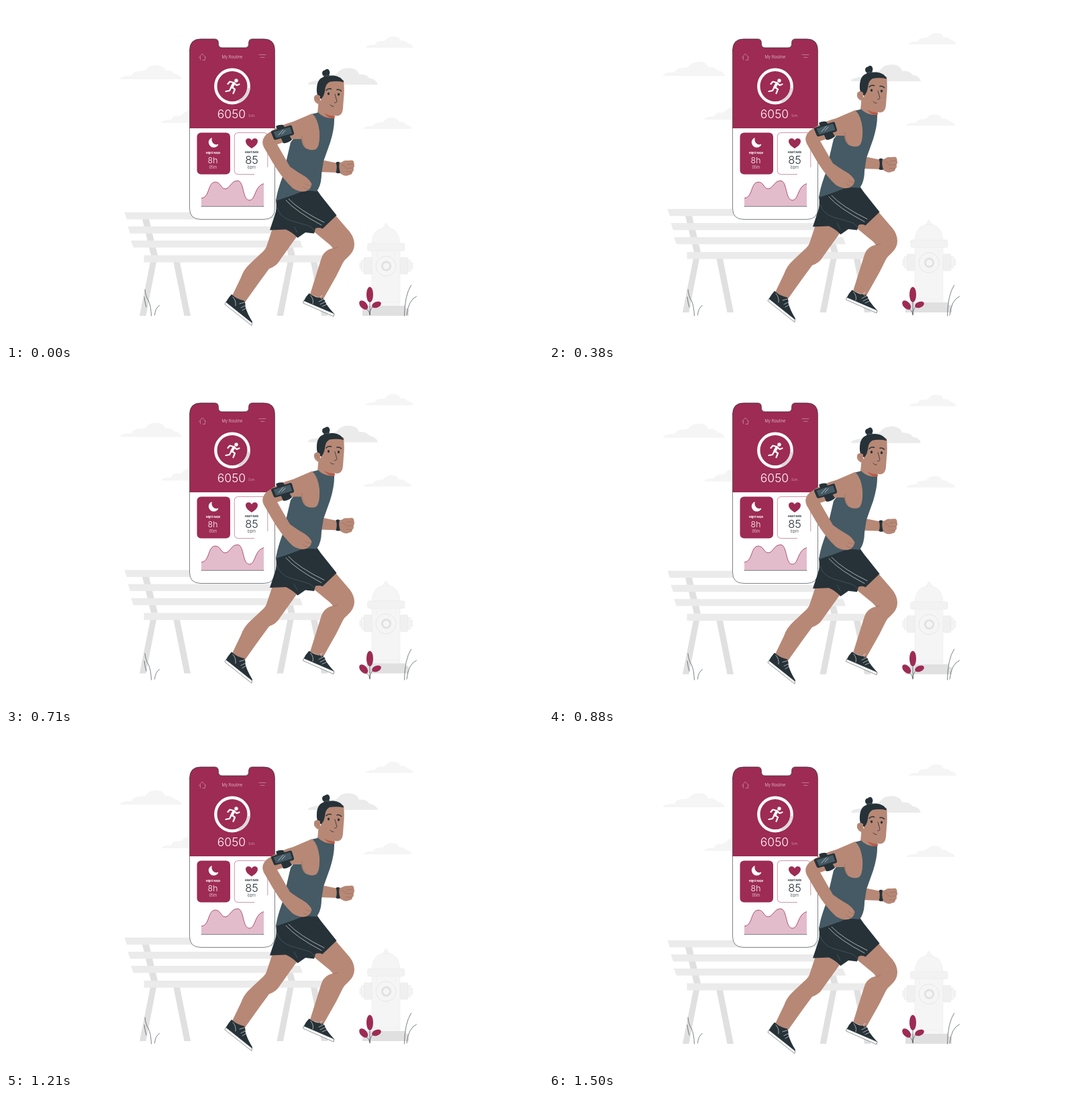
These frames come from a looping animation (800x500 px, 1540 ms). An HTML page:

```html
<!DOCTYPE html>
<html lang="en">
<head>
<meta charset="utf-8">
<title>Runner</title>
<style>
  html, body { margin: 0; width: 100%; height: 100%; overflow: hidden; background: #fff; }
  svg { display: block; width: 100vw; height: 100vh; }
  text { font-family: Inter, "Open Sans", sans-serif; text-anchor: middle; }
  .light { font-weight: 300; }
  .bold { font-weight: 700; }
  .wine { fill: #9d2b53; }
  .skin { fill: #b78876; }
  .dark { fill: #263238; }
  .tank { fill: #455a64; }
  .white { fill: #fff; }
  .line { fill: none; stroke: #263238; stroke-width: .6; stroke-linecap: round; stroke-linejoin: round; }
  .thin { fill: none; stroke: #fff; stroke-width: .6; stroke-linecap: round; }
  .crease { fill: none; stroke: #8d6253; stroke-width: .5; stroke-linecap: round; }
</style>
</head>
<body>
<svg viewBox="0 0 800 500" xmlns="http://www.w3.org/2000/svg">
  <defs>
    <path id="cloud" d="M0 0Q0-3 5-4Q11-6 17-5Q20-12 28-12Q36-12 38-14Q43-21 53-21Q62-21 65-17Q67-15 67-13Q77-14 81-8Q90-7 92 0Z"/>
    <g id="legs">
      <path d="M203 317H213L226 371H216Z"/>
      <path d="M215 381H224L208.500 461H199Z"/>
      <path d="M249.500 381H259L275 461H265.500Z"/>
    </g>
  </defs>

  <!-- scenery -->
  <g class="bob">
    <g fill="#f5f5f5">
      <use href="#cloud" transform="translate(170 109)"/>
      <use href="#cloud" transform="translate(536 62) scale(.77 .8)"/>
      <use href="#cloud" transform="translate(533 183) scale(.78 .8)"/>
      <use href="#cloud" transform="translate(232 174) scale(.8 .87)"/>
    </g>
    <use href="#cloud" fill="#ebebeb" transform="translate(450 117) scale(1.13 1.18)"/>

    <g fill="#e0e0e0">
      <use href="#legs"/>
      <use href="#legs" x="204.500"/>
    </g>
    <g fill="#ebebeb">
      <path d="M176.500 307H428L432 317.500H180Z"/>
      <path d="M181.500 328H433L437 338.500H185Z"/>
      <path d="M186 349H438L442 359.500H190Z"/>
      <path d="M205.500 371H487V381.500H205.500Z"/>
    </g>

    <g fill="#f5f5f5" stroke="#e8e8e8" stroke-width=".5">
      <path fill="#e0e0e0" stroke="none" d="M531 452Q531 450 534 450H537V446H595V450H598Q600 450 600 452V461H531Z"/>
      <path d="M545 363H587V445H545Z"/>
      <path d="M561 331L566 323L572 331Z"/>
      <path d="M545 355Q546 330 566 330Q586 330 587 355Z"/>
      <rect x="538.500" y="353" width="55.500" height="11.500" rx="3" fill="#f2f2f2"/>
      <rect x="533" y="374" width="12.500" height="25" rx="2" fill="#f0f0f0"/>
      <rect x="587" y="374" width="12" height="25" rx="2" fill="#f0f0f0"/>
      <rect x="529.500" y="378" width="3.500" height="17"/>
      <rect x="527" y="382" width="2.500" height="9"/>
      <rect x="599" y="378" width="4" height="17"/>
      <rect x="603" y="382" width="3" height="9"/>
      <circle cx="566" cy="387" r="15" stroke="#e0e0e0" stroke-width=".7"/>
      <circle cx="566.500" cy="387" r="7.500" fill="#e0e0e0"/>
      <circle cx="566.500" cy="387" r="4.800"/>
      <path fill="none" d="M552 367V373M580 367V373M547 441H586"/>
    </g>
  </g>

  <!-- phone -->
  <path class="white" d="M273.500 180V301Q273.500 317.500 290 317.500H384Q400.500 317.500 400.500 301V180Z"/>
  <path class="wine" d="M273.500 182V66Q273.500 49 290 49H311Q316.500 49 316.500 55V56Q316.500 62 322 62H356Q361.500 62 361.500 56V55Q361.500 49 367 49H384Q400.500 49 400.500 66V182Z"/>
  <path class="line" d="M273.500 66V301Q273.500 317.500 290 317.500H384Q400.500 317.500 400.500 301V66Q400.500 49 384 49H367Q361.500 49 361.500 55V56Q361.500 62 356 62H322Q316.500 62 316.500 56V55Q316.500 49 311 49H290Q273.500 49 273.500 66Z"/>
  <path class="thin" opacity=".6" d="M287.500 77L292.500 71L297.500 76.500M289.500 76V80M293 80.500H296.500V76M377 72.500H387M379.500 76.500H385"/>
  <text class="light white" x="337" y="77.500" font-size="5.900" opacity=".8">My Routine</text>
  <circle cx="337" cy="119.500" r="24.700" fill="none" stroke="#fff" stroke-width="4.400"/>
  <path d="M361.600 122A24.700 24.700 0 0 1 346.500 142.300" fill="none" stroke="#ded7da" stroke-width="4.400"/>
  <g fill="none" stroke="#fff" stroke-linecap="round" stroke-linejoin="round">
    <circle cx="343" cy="111" r="2.700" fill="#fff" stroke="none"/>
    <path stroke-width="4.200" d="M339.500 115L336.500 120.500"/>
    <path stroke-width="2.200" d="M339 114L333.500 112.500L330.500 116M340.500 115L343.500 118L347.500 116.500M337 121L341 124L338.500 130M335.500 121L333 126L327.500 127"/>
  </g>
  <text class="light white" x="336" y="166.500" font-size="17.500">6050</text>
  <text class="light white" x="366.500" y="165" font-size="5.300" opacity=".65">Sch.</text>

  <rect class="wine" x="284.500" y="188.500" width="49.500" height="62" rx="6"/>
  <path class="white" d="M307 196Q301 198 302 204.500Q304 211 310.500 210.500Q315 210 316.500 205.500Q311 207.500 308 203.500Q305.500 199.500 307 196Z"/>
  <text class="bold white" x="308.500" y="219.500" font-size="4">Night Naps</text>
  <text class="light white" x="308" y="234" font-size="12.300">8h</text>
  <text class="light white" x="308.300" y="241.500" font-size="5.600">05m</text>

  <path d="M370 250.500H346.300Q340.300 250.500 340.300 244.500V194.500Q340.300 188.500 346.300 188.500H383.800Q389.800 188.500 389.800 194.500V240" fill="none" stroke="#9d2b53" stroke-width=".5"/>
  <path class="wine" d="M366 212Q357 206.500 357 201.500Q357 197 361.500 197Q364.500 197 366 200Q367.500 197 370.500 197Q375 197 375 201.500Q375 206.500 366 212Z"/>
  <text class="bold dark" x="366" y="218.500" font-size="4">Heart Rate</text>
  <text class="light dark" x="366" y="235" font-size="16.500">85</text>
  <text class="light dark" x="366" y="242" font-size="5.800">bpm</text>

  <path fill="#e3bccb" d="M291 286C304 285 300 262 312 262C320 262 320 272 326.500 272C334 272 335 260 345 260C355 260 352 289 362.500 289C372 289 370 268 384 264.500V298H291Z"/>
  <path fill="none" stroke="#9d2b53" stroke-width=".8" d="M291 286C304 285 300 262 312 262C320 262 320 272 326.500 272C334 272 335 260 345 260C355 260 352 289 362.500 289C372 289 370 268 384 264.500"/>
  <path class="line" d="M291 298.300H384"/>

  <!-- plants -->
  <g class="line">
    <path d="M207 422Q208 432 212 438Q216 446 216.500 461M206 433Q207 442 209 448M228.500 445.500Q222 450 221.500 460"/>
    <path d="M603.500 415.500Q594 430 593.500 461M611.500 432Q599 438 597 460"/>
    <path d="M542 439V460M536 450Q541 453 542 459M547 447Q542 451 542 459"/>
  </g>
  <g class="wine">
    <ellipse cx="542" cy="429.500" rx="5" ry="11.500"/>
    <ellipse cx="532.700" cy="445" rx="8" ry="5" transform="rotate(48 532.700 445)"/>
    <ellipse cx="552" cy="444.500" rx="7.200" ry="4.300" transform="rotate(-22 552 444.500)"/>
  </g>

  <!-- runner -->
  <g class="bob">
    <!-- far arm -->
    <path class="skin" d="M470 229L492 233.500L500 232.500Q504 229 508 230L516 229.500Q519 231 518.500 235Q520 239 517.500 241Q519 245 516 247Q516 251 511 251.500Q506 254 501 251L496 248L468 247Z"/>
    <path class="crease" d="M508 236L517 235M507 241.500L517 241M507 246.500L515 247M501 237Q505 237 506 241"/>
    <path class="dark" d="M491.500 233Q494 231 497 232.500Q495 240 498 248Q495 250 491.500 248Q494 240 491.500 233Z"/>

    <!-- rear leg -->
    <path class="skin" d="M398 322L396 334L388 358Q386 363 380 368L364 383Q354 392 350 404L337 431L355.500 441.500L378 410L392 391Q403 387 407.500 379L434 342L430 322Z"/>
    <path class="dark" d="M336 429Q345 437 354.500 438.500Q357 441 356.500 447Q359 457 367 470L366 473L327 442.500Q329 437 336 429Z"/>
    <path d="M327.500 440.500L366.500 471.500L366 475.500L326 444Z" fill="#fff" stroke="#263238" stroke-width=".5"/>
    <path class="thin" d="M338 433Q343 438 342 446M348 443L355 441M350 449L356 446M352 453L357 450"/>

    <!-- front leg -->
    <path class="skin" d="M456 325L459 336L476 350Q484 356 487 360.500Q473 363 469 378L453 429L472.500 436.500L492 402L502 382Q504 378 509 374Q519 365 519 355Q519 345 512 336L488 308Z"/>
    <path class="crease" d="M487 360.500Q490 361 494 359"/>
    <path class="dark" d="M451.500 427.500Q460 434 471 434.500L475 438Q476 444 489 458L488 461L443 440Q446 433 451.500 427.500Z"/>
    <path d="M443.500 438.500L489 458L488 462L442.500 442Z" fill="#fff" stroke="#263238" stroke-width=".5"/>
    <path class="thin" d="M454 431Q459 437 457 443M466 440L474 436M468 444L476 440M471 447L478 444M470 436Q467 431 471 431"/>

    <!-- shorts -->
    <path class="dark" d="M402 288Q404 302 400.500 311L393 333.500L417 332.500Q427 337 434.500 345L446 337L459 338.500L461 331Q466 329 471.500 331.500L492.500 311.500L469 282L462 272L438 274Z"/>
    <path fill="none" stroke="#53656d" stroke-width=".6" d="M404 300Q407 313 423 319L447 326Q456 328 459 334M429 328L434 337"/>
    <path class="thin" stroke-width=".8" d="M417 289Q432 306 470 326M421 287Q437 304 474 322"/>

    <!-- neck and head -->
    <path class="skin" d="M466 138L464 160Q472 172 489 168L489 158Z"/>
    <path fill="#bb5743" d="M474 159Q481 164 490 163.500L489.500 167Q480 168 474 159Z"/>
    <path class="skin" d="M472 110H503Q504.500 126 503 138L502 152C501.500 160 498 163.500 493 163.500C484 163 477 158 472 151Q466 140 472 110Z"/>
    <path class="dark" d="M463 128Q462 111 471 106.500Q478 103 488 103.500Q499 104.500 503.500 113.500Q492 111 482 113Q476.500 116 475.500 123Q474.500 133 470 138Q464 138 463 128Z"/>
    <path class="dark" d="M471 100Q471 96 475 95.500Q478 92.500 481 95Q483.500 99 481.500 102L482 106H473L473.500 104Q471 103 471 100Z"/>
    <path d="M473.500 104.500Q478 102.500 482 104.500" fill="none" stroke="#66757c" stroke-width=".5"/>
    <path class="skin" d="M468 134Q463 130 459.500 134Q457.500 139 461 143Q464 147 468 145Z"/>
    <path class="crease" d="M461.500 136Q465 136 465 141"/>
    <ellipse class="dark" cx="480.500" cy="130.500" rx="1.600" ry="2.100"/>
    <ellipse class="dark" cx="495.500" cy="131.500" rx="1.600" ry="2.100"/>
    <path class="line" style="stroke-width:1.500" d="M477 125.500Q480 122 484.500 123.500M493 124.500Q497 123.500 499.500 126.500"/>
    <path class="line" style="stroke-width:.8" d="M490 131L493 142Q492 144.500 489.500 144M483 147Q484.500 150 488 149.500"/>

    <!-- torso -->
    <path class="tank" d="M455 161L465 158.500Q474 168 489 167Q489.500 182 483 203L473 231L470 250Q470 267 462.500 276Q450 274 440 276.500Q424 283 402 290Q404 275 412 254L424 203L434 190Z"/>

    <!-- near arm -->
    <path class="skin" d="M456 160Q465 168 467 187Q468 208 462 213Q455 216 447 212Q441 208 440 198L428 198L404 206L423 239Q434 247 442 251.500Q452 257 455.500 265Q454 273 447 275.500Q437 278 427 271Q411 256 398 234L384 210Q379 200 388 191Q405 178 428 172Z"/>
    <path class="crease" d="M441 193Q440 202 445 209M455 267Q449 268 446 264M450 273Q444 272 443 269"/>

    <!-- armband -->
    <path class="dark" d="M402 179Q407 176 413 177L426 199Q419 205 413 204Z"/>
    <path class="dark" d="M396 186L423.500 177.500Q425.500 177 426 179L429 189Q429.500 191 427.500 192L402 199Q400 199.500 399 198L395 188.500Q394.500 187 396 186Z"/>
    <path d="M398.500 187.500L423 180L426.500 189.500L402.500 196.500Z" fill="#455a64"/>
    <path class="thin" d="M406 192L413 184M411 190.500L416 185"/>
  </g>
</svg>
<script>
  const LOOP = 1540, STEP = 1000 / 24, HALF = 750, RISE = 10;
  const parts = document.querySelectorAll(".bob");

  // Steady rise and fall, held at 24 steps a second
  function draw(ms) {
    const t = Math.floor((ms % LOOP + 5) / STEP) * STEP;
    const y = -RISE * Math.max(0, 1 - Math.abs(t / HALF - 1));
    parts.forEach(p => p.setAttribute("transform", `translate(0 ${y.toFixed(3)})`));
  }

  const start = performance.now();
  function tick() {
    draw(performance.now() - start);
    requestAnimationFrame(tick);
  }
  tick();
</script>
</body>
</html>
```
